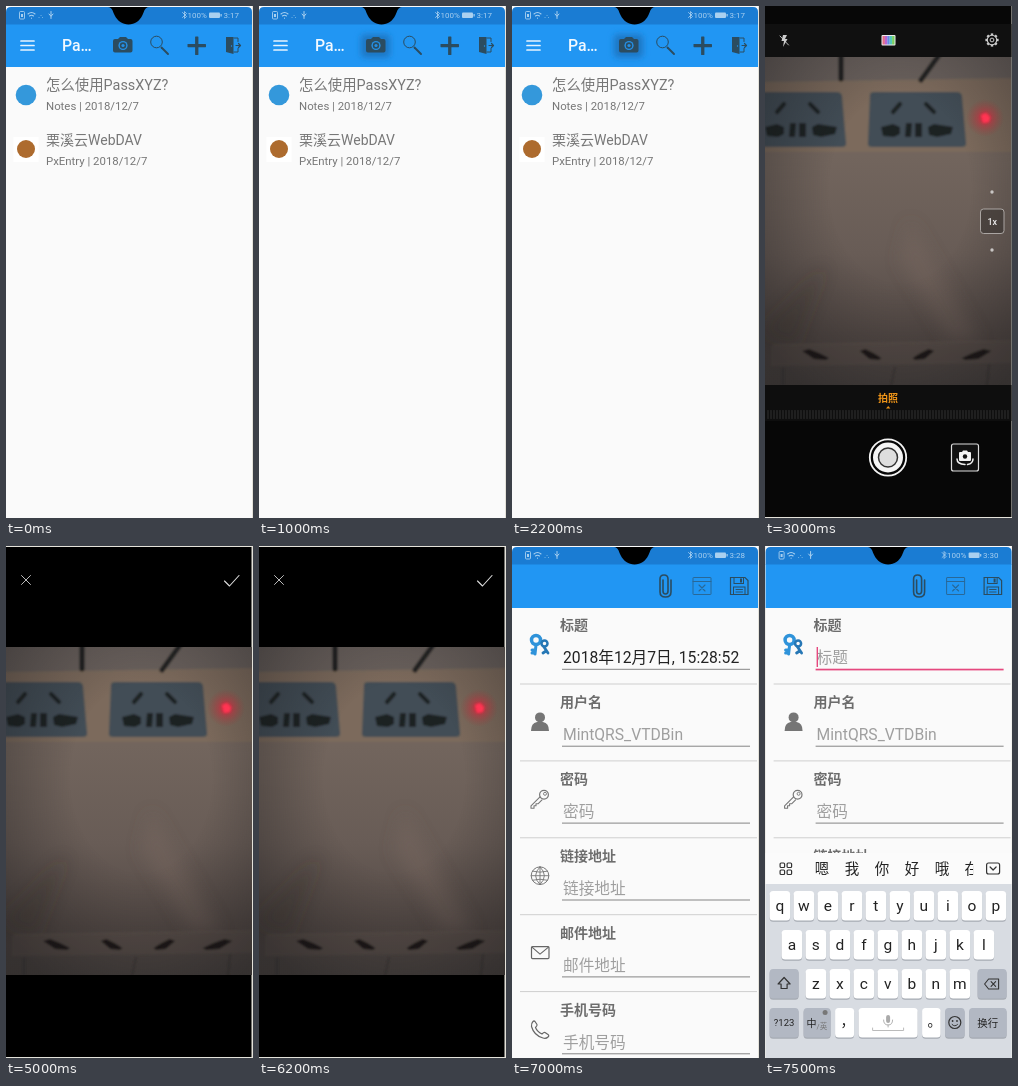
Animation, 247 px wide and 512 px high, one loop 8 s. Source, as an HTML page:

```html
<!DOCTYPE html>
<html lang="zh-CN">
<head>
<meta charset="utf-8">
<title>Password entry demo</title>
<style>
  html, body { margin: 0; width: 100%; height: 100%; overflow: hidden; background: #e4e2da; }
  svg { display: block; width: 247px; height: 512px; }
  text { font-family: Roboto, "Noto Sans CJK SC", "Noto Sans CJK", sans-serif; }
  .scene { visibility: hidden; }
  .line { fill: none; stroke-linecap: round; stroke-linejoin: round; }
</style>
</head>
<body>
<svg id="stage" viewBox="0 0 247 512" xmlns="http://www.w3.org/2000/svg"></svg>
<script>
const LOOP = 8000;
const STEPS = [
  [0, 'list'], [1000, 'pressed'], [3000, 'camera'],
  [5000, 'review'], [7000, 'form'], [7500, 'typing']
];
const INK = '#2b4c60';

const rect = (x, y, w, h, fill, r = 0, extra = '') =>
  `<rect x="${x}" y="${y}" width="${w}" height="${h}" rx="${r}" fill="${fill}" ${extra}/>`;
const circle = (x, y, r, fill, extra = '') =>
  `<circle cx="${x}" cy="${y}" r="${r}" fill="${fill}" ${extra}/>`;
const path = (d, fill, extra = '') => `<path d="${d}" fill="${fill}" ${extra}/>`;
const line = (d, color, w = 1) =>
  `<path class="line" d="${d}" stroke="${color}" stroke-width="${w}"/>`;
const text = (x, y, size, fill, s, extra = '') =>
  `<text x="${x}" y="${y}" font-size="${size}" fill="${fill}" ${extra}>${s}</text>`;
const mid = (x, y, size, fill, s, extra = '') =>
  text(x, y, size, fill, s, `text-anchor="middle" ${extra}`);
const at = (x, y, s) => `<g transform="translate(${x} ${y})">${s}</g>`;

function header(clock, bottom) {
  const pale = '#a9d0f0';
  return path('M0 19V6Q0 1 5 1H241Q246 1 246 6V19Z', '#1a7cd3') +
    rect(0, 18.5, 246, bottom - 18.5, '#2196f3') +
    path('M102 1C106.500 1.500 106.500 5 108.500 9C111.500 15 116.500 18.500 122.500 18.500C129 18.500 133.500 15 136.500 9C138.500 5 138.500 1.500 143 1Z', '#000') +
    rect(13.5, 5.5, 5, 7.5, 'none', 1, `stroke="${pale}" stroke-width=".9"`) +
    rect(15, 8, 2, 3, pale) +
    line('M22 8Q25.500 5 29 8M23.500 10Q25.500 8.400 27.500 10M25.500 12v.2', pale, 1.1) +
    line('M33 11.500h.1M35 9.500h.1M36.500 11.500h.1', '#79b8e6', 1) +
    line('M45 5.500v7M43 8l2 2.300l2-2.300', pale, 1) +
    line('M176.500 6.500l4 4l-2 2v-7l2 2l-4 4', pale, .8) +
    text(181.5, 12.2, 8, pale, '100%') +
    rect(203, 6.5, 11, 5.5, pale, 1) + rect(214.5, 8, 1.2, 2.5, pale) +
    text(217.5, 12.2, 8, pale, clock);
}

function entry(y, icon, title, size, info) {
  return icon + text(40, y + 5, size, '#777', title) + text(40, y + 25.3, 11.4, '#777', info);
}

function listScene(pressed) {
  const cam = path('M109 33h3l2-2h6l2 2h2.500q2 0 2 2v9.500q0 2-2 2h-15.500q-2 0-2-2v-9.500q0-2 2-2Z', INK) +
    circle(117, 39.5, 4.6, '#2590e6') + circle(117, 39.5, 3.2, INK) + circle(117, 39.5, 1.6, '#2590e6');
  const door = path('M220 31h7.500v17l-7.500-2Z', INK) +
    line('M228 32h4v3.500M228 46h4v-3.500', INK, 1) +
    line('M230 39.500h4M232.500 37.500l2 2l-2 2', INK, 1.2) + circle(225.5, 40, .7, '#2196f3');
  return rect(0, 0, 246, 512, '#fafafa') + header('3:17', 61) +
    (pressed ? rect(102, 28.5, 29, 23, '#1e76c2', 4, 'filter="url(#soft3)"') : '') +
    line('M15 35h13M15 39.500h13M15 44h13', '#e7f4fe', 1.7) +
    text(56, 45, 15.8, '#f2f9ff', 'Pa…', 'font-weight="500"') + cam +
    line('M155.500 41.500l6.500 6.500', INK, 1.9) +
    circle(150.5, 36, 5.8, 'none', `stroke="${INK}" stroke-width="1"`) +
    rect(181.5, 37.9, 18.5, 3.3, INK, .6) + rect(189.1, 30.5, 3.3, 18.5, INK, .6) + door +
    entry(79, circle(20, 89, 10.3, '#3498db'), '怎么使用PassXYZ?', 14.4, 'Notes | 2018/12/7') +
    entry(134, rect(7.5, 131, 25, 25, '#fff') + circle(20, 143, 9, '#ad6b2e'),
      '栗溪云WebDAV', 14, 'PxEntry | 2018/12/7');
}

// A socket plate starting at x; its slots can sit off centre.
function socket(x, shift) {
  const dark = '#1d2023', s = x + shift;
  return path(`M${x + 6} 86H${x + 89}Q${x + 93} 86 ${x + 94} 90L${x + 98} 136Q${x + 99} 141 ${x + 94} 141H${x + 4}Q${x - 1} 141 ${x} 136L${x + 2} 89Q${x + 2} 86 ${x + 6} 86Z`, '#434e56') +
    line(`M${s + 25} 106l7-8M${s + 58} 98l8 8`, dark, 4.2) +
    path(`M${s + 13} 121l12-3l7 3v7l-6 3l-11-1Z`, dark) +
    path(`M${s + 60} 121l6-3l19 3l-2 7l-14 3l-8-2Z`, dark) +
    path(`M${s + 38} 117h6l-1 14h-6ZM${s + 47} 117h7v14h-7Z`, dark);
}

function photo(dy) {
  const holes = [[51, 1], [106, .8], [158, -.8], [211, -1.1]].map(([x, k]) =>
    `<g transform="translate(${x} 349) scale(${k} 1)">` +
    path('M-14-4L-7-6L3-2L13 3L10 5L-2 4Z', '#1c1917') + '</g>').join('');
  return `<g transform="translate(0 ${dy})"><g clip-path="url(#photo)">` +
    rect(0, 51, 246, 328, 'url(#wall)') +
    `<g filter="url(#soft1)">` +
    path('M-4 48H250V73L140 75L-4 77Z', '#69615c') +
    path('M-4 76L250 72V146H-4Z', '#7b6a5b') +
    line('M76 48V73', '#1b1a1a', 5) + line('M177 45L156 74', '#222120', 5) +
    socket(-17, 4) + socket(103, 0) + '</g>' +
    `<g filter="url(#soft8)">` +
    path('M145 215L215 335H185L135 255Z', '#7c6c63', 'opacity=".35"') +
    path('M-5 325L60 260L30 340Z', '#3f3734', 'opacity=".3"') + '</g>' +
    `<g filter="url(#soft1)">` +
    path('M6 340L246 336V357L6 360Z', '#5b504a', 'opacity=".8"') +
    line('M8 339L246 335', '#655851', 1.2) + holes +
    line('M18 362V380M130 361L126 380M224 358L222 380', '#383331', 1.2) + '</g>' +
    rect(0, 51, 246, 328, 'url(#shade)') +
    circle(220, 112, 19, 'url(#lamp)') +
    path('M216 109L221 107L225 111L224 116L218 117Z', '#ff3652', 'filter="url(#soft1)"') +
    '</g></g>';
}

function cameraScene() {
  const colors = ['#e36d88', '#bb66d2', '#6689e8', '#55c8ba', '#79cf61'];
  const teeth = Array.from({ length: 8 }, (_, i) =>
    `<rect x="-1.200" y="-6.600" width="2.400" height="2.500" fill="#ccc" transform="rotate(${i * 45})"/>`).join('');
  let ticks = '';
  for (let x = 3; x < 245; x += 3) ticks += `M${x} 404.500v8`;
  return rect(0, 0, 246.5, 511, '#070707') + rect(0, 18, 246.5, 33, '#101010') + photo(0) +
    path('M18 29h4l-2 4h2.500l-4.500 8l1-6h-2.500Z', '#ccc') + line('M15 30l8.500 9', '#ccc', .9) +
    rect(116.5, 29, 14, 10.5, '#eee', 1) +
    colors.map((c, i) => rect(117.5 + i * 2.4, 30, 2.4, 8.5, c)).join('') +
    at(227, 34, teeth + circle(0, 0, 4.7, '#101010', 'stroke="#ccc" stroke-width="1.100"') +
      circle(0, 0, 1.9, 'none', 'stroke="#ccc" stroke-width="1"')) +
    circle(227, 186, 1.7, '#c9c6c4') + circle(227, 244, 1.7, '#c9c6c4') +
    rect(215.5, 203, 23.5, 24.5, '#302c2a', 3, 'fill-opacity=".5" stroke="#aaa5a2" stroke-width="1"') +
    mid(227.3, 218.7, 9, '#eee', '1x', 'font-weight="500"') +
    rect(0, 379, 246.5, 36, '#0e0e0e') +
    mid(123, 395.7, 10, '#ee9418', '拍照', 'font-weight="700"') +
    path('M121 402.500l2.200-2.500l2.200 2.500Z', '#ee9418') + line(ticks, '#3c3c3c', .8) +
    circle(123, 451.5, 18.2, 'none', 'stroke="#f4f4f4" stroke-width="1.800"') +
    circle(123, 451.5, 15, '#f5f5f5') +
    circle(123, 451.5, 9.5, '#dedede', 'stroke="#333" stroke-width="1.500"') +
    rect(186.5, 438, 27, 27, '#111', 2, 'stroke="#ddd" stroke-width="1.200"') +
    path('M195 446h2l1-1.500h4l1 1.500h2q1 0 1 1v7q0 1-1 1h-10q-1 0-1-1v-7q0-1 1-1Z', '#f2f2f2') +
    circle(200, 450.5, 2.2, '#111') +
    line('M192 453q0 5 8 5.500M208 453q0 4.500-5.500 5.500', '#f2f2f2', 1.5);
}

function reviewScene() {
  return rect(0, 1, 245.5, 510, '#000') + photo(50) +
    line('M15.500 29.500l9 9M24.500 29.500l-9 9', '#bbb', 1) +
    line('M218.500 35l5 5l9.500-10.500', '#ddd', 1.1);
}

const ICONS = [
  circle(-4, -5, 4.5, 'none', 'stroke="#2f93da" stroke-width="3.500"') +
    line('M-4 0L-5 9M-5 5l-3 0M-5 8l-3 0', '#2f93da', 3) +
    circle(4.5, -1.5, 3, 'none', 'stroke="#2677b5" stroke-width="2.500"') +
    line('M4 2L8 8M6 6l-3 2', '#2677b5', 2.8),
  circle(0, -4.5, 5, '#757575') + path('M-9 9Q-9 1-3 0H3Q9 1 9 9Z', '#757575'),
  circle(4, -4, 4.4, 'none', 'stroke="#777" stroke-width="1.200"') +
    circle(5, -5, 1.5, 'none', 'stroke="#777" stroke-width=".9"') +
    line('M0-2L-9 7V9.500H-6V7H-4V5H-2L2 1', '#777', 1.1),
  circle(0, 0, 8.8, 'none', 'stroke="#777" stroke-width="1"') +
    line('M0-8.800V8.800M-8.800 0H8.800M-7.500-4.500Q0-2.500 7.500-4.500M-7.500 4.500Q0 2.500 7.500 4.500M0-8.800Q-9 0 0 8.800M0-8.800Q9 0 0 8.800', '#777', .9),
  rect(-8.5, -6, 17.5, 12, 'none', 1, 'stroke="#666" stroke-width="1.200"') +
    line('M-8-5.500L0 1.500L8.500-5.500', '#666', 1.1),
  line('M-7-8Q-9-6-8.500-3Q-6 6 3 8.500Q6 9.500 8 7.500Q9.500 6 8 5L5 3Q4 2.500 2 4.500Q-3 2-4.500-2Q-2.500-4-3-5L-5-8Q-6-9-7-8Z', '#666', 1.2)
];

function formScene(typing) {
  const fields = [
    ['标题', typing ? '标题' : '2018年12月7日, 15:28:52'], ['用户名', 'MintQRS_VTDBin'],
    ['密码', '密码'], ['链接地址', '链接地址'], ['邮件地址', '邮件地址'], ['手机号码', '手机号码']
  ];
  const rows = fields.map(([label, value], i) => {
    const active = typing && i === 0;
    const color = i === 0 && !typing ? '#222' : '#9f9f9f';
    return at(0, i * 76.9,
      at(28, 99, ICONS[i]) +
      text(48, 84.3, 14, '#6d6d6d', label, 'font-weight="700"') +
      text(51, 117, 15.7, color, value) +
      rect(50, active ? 122.7 : 122.8, 188, active ? 1.7 : 1, active ? '#e5487e' : '#858585') +
      (active ? rect(51, 101, 1.4, 20, '#e5487e') : '') +
      rect(8, 137.5, 237, 1, '#cfcfcf'));
  }).join('');
  const tools =
    line('M151 34V45Q151 48 153.500 48Q156 48 156 45V33Q156 29 152 29Q148 29 148 33V46Q148 51 153.500 51Q159 51 159 46V34', INK, 1.6) +
    rect(181, 31.5, 18, 17, 'none', .5, 'stroke="#286898" stroke-width="1"') +
    line('M181 35.500H199M187 39l6 6M193 39l-6 6', '#286898', 1.1) +
    path('M218.500 31.500H233L236 34.500V48.500H218.500Z', 'none', `stroke="${INK}" stroke-width="1.200"`) +
    rect(222, 31.5, 9.5, 6, 'none', 0, `stroke="${INK}" stroke-width="1"`) + rect(228, 32.5, 2, 4, INK) +
    rect(221.5, 41, 11.5, 7.5, 'none', 0, `stroke="${INK}" stroke-width="1"`) +
    line('M224 43.500h6.500M224 46h6.500', INK, .9);
  const page = rect(0, 0, 246, 512, '#fafafa') + rows + header(typing ? '3:30' : '3:28', 62) + tools;
  return typing ? at(.6, 0, page + keyboard()) : page;
}

function key(x, y, w, fill, label = '', size = 15.5) {
  return rect(x, y + 1.2, w, 29.5, '#a5aab2', 3.5) + rect(x, y, w, 29.5, fill, 3.5) +
    (label ? mid(x + w / 2, y + 15 + size * .34, size, '#222', label) : '');
}

function keyboard() {
  const grey = '#b2b8c3', white = '#fff';
  const letters = (s, x, y) => [...s].map((c, i) => key(x + i * 24, y, 20.5, white, c)).join('');
  const grid = [[14.5, 317], [21.5, 317], [14.5, 324], [21.5, 324]]
    .map(([x, y]) => rect(x, y, 4.5, 4.5, 'none', 1, 'stroke="#333" stroke-width="1.200"')).join('');
  return rect(0, 307, 246, 31, '#fbfbfb') + rect(0, 338, 246, 174, '#d8dce2') + grid +
    [...'嗯我你好哦'].map((c, i) => mid(56.5 + i * 30, 327.7, 14.5, '#222', c)).join('') +
    `<g clip-path="url(#words)">${text(199, 327.7, 14.5, '#222', '在')}</g>` +
    rect(221, 317, 13, 11, 'none', 2, 'stroke="#333" stroke-width="1.200"') +
    line('M224.500 321l3 3l3-3', '#333', 1.2) +
    letters('qwertyuiop', 4, 345) + letters('asdfghjkl', 16, 384) + letters('zxcvbnm', 40, 423) +
    key(4, 423, 29, grey) + line('M18.500 431.500l-6 6.500h3v4.500h6v-4.500h3Z', '#333', 1.2) +
    key(212, 423, 29, grey) + line('M219 438l4-5h10v10h-10ZM225.500 435.700l4.500 4.600M230 435.700l-4.500 4.600', '#333', 1.1) +
    key(4, 462, 29, grey, '?123', 9.5) + key(38, 462, 27, grey) +
    text(41, 481, 10, '#222', '中') + text(51, 483, 7.5, '#777', '/英') +
    circle(59.5, 466.5, 2.5, '#777') +
    key(69.5, 462, 19, white) + text(75, 480, 14, '#222', '，') +
    key(93, 462, 59, white) + rect(120.5, 469, 4, 8, '#aaa', 2) +
    line('M118 474q0 5 4.500 5t4.500-5M122.500 479v2', '#aaa', .9) +
    line('M107 482v2.500h31v-2.500', '#bbb', 1) +
    key(156.5, 462, 18.5, white) + text(162, 480, 14, '#222', '。') +
    key(179.5, 462, 19.5, grey) +
    circle(189.2, 476.5, 6, 'none', 'stroke="#333" stroke-width="1.200"') +
    circle(187, 475, .9, '#333') + circle(191.4, 475, .9, '#333') +
    line('M186.500 478.500q2.700 2.800 5.400 0', '#333', 1) +
    key(203.5, 462, 37.5, grey, '换行', 10.5);
}

const soft = n => `<filter id="soft${n}" x="-40%" y="-40%" width="180%" height="180%"><feGaussianBlur stdDeviation="${n}"/></filter>`;
const stop = (o, c, a = 1) => `<stop offset="${o}" stop-color="${c}" stop-opacity="${a}"/>`;
const defs = `<defs>${[1, 3, 8].map(soft).join('')}
  <clipPath id="photo"><rect y="51" width="246" height="328"/></clipPath>
  <clipPath id="words"><rect x="196" y="308" width="11.500" height="29"/></clipPath>
  <linearGradient id="wall" x1="0" y1="0" x2="0" y2="1">
    ${stop(0, '#69615c')}${stop(.3, '#72655d')}${stop(.6, '#685c56')}${stop(.85, '#544a46')}${stop(1, '#4d4643')}
  </linearGradient>
  <radialGradient id="shade" cx=".55" cy=".4" r=".72">${stop(.4, '#141416', 0)}${stop(1, '#141416', .42)}</radialGradient>
  <radialGradient id="lamp">${stop(0, '#ff1738', .9)}${stop(.4, '#d32338', .45)}${stop(1, '#a03030', 0)}</radialGradient>
</defs>`;

const scenes = {
  list: listScene(false), pressed: listScene(true), camera: cameraScene(),
  review: reviewScene(), form: formScene(false), typing: formScene(true)
};
const stage = document.getElementById('stage');
stage.innerHTML = defs + Object.entries(scenes)
  .map(([id, s]) => `<g id="${id}" class="scene">${s}</g>`).join('');

const start = performance.now();
let shown;
function draw(now) {
  const t = Math.max(0, now - start) % LOOP;
  const id = STEPS.filter(([from]) => t >= from).pop()[1];
  if (id !== shown) {
    if (shown) document.getElementById(shown).style.visibility = 'hidden';
    document.getElementById(id).style.visibility = 'visible';
    shown = id;
  }
  requestAnimationFrame(draw);
}
draw(start);
</script>
</body>
</html>
```
